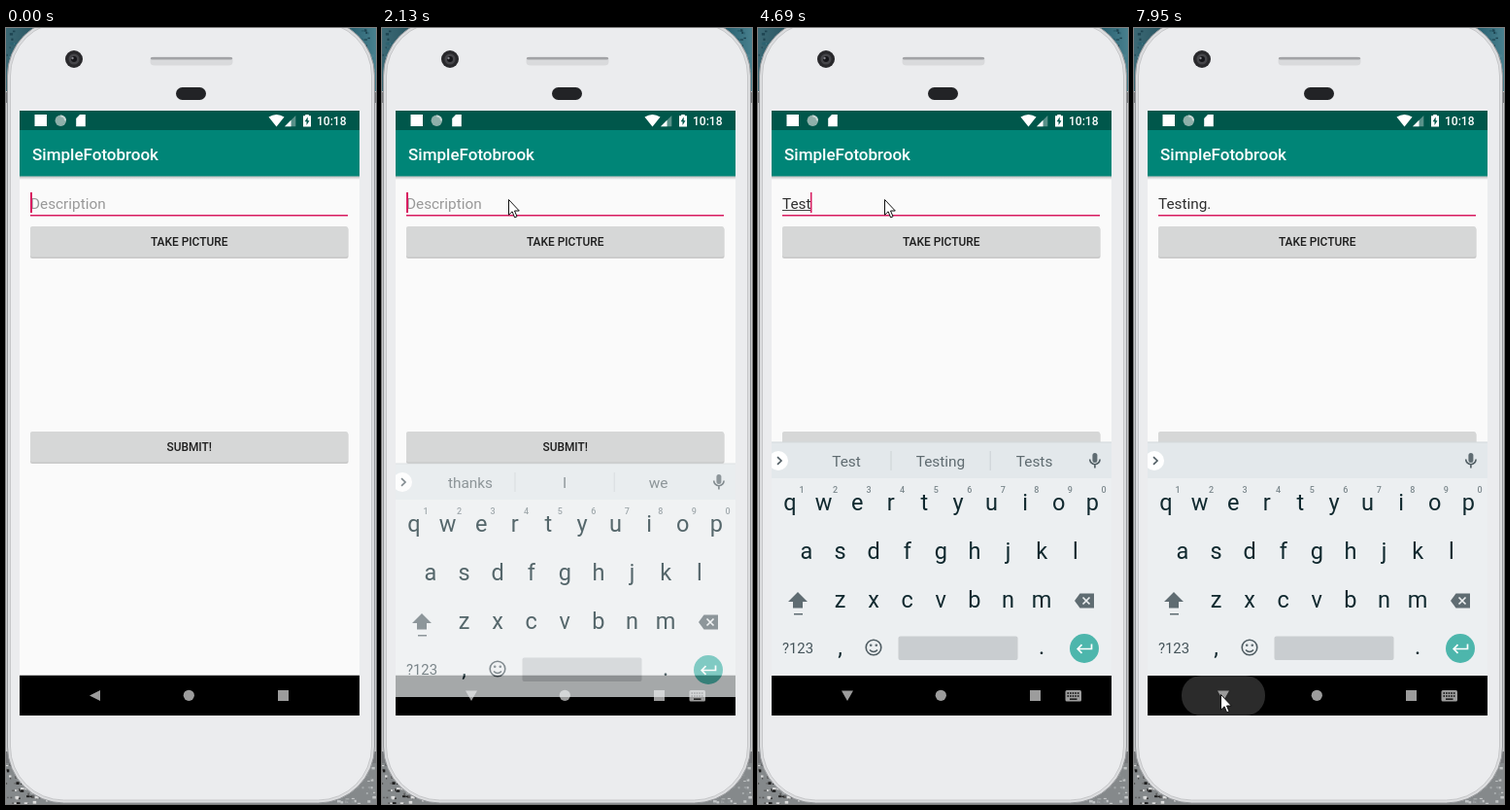
Write an HTML page that moves like this. It is 381x798 px and loops after 8000 ms.

```html
<!DOCTYPE html>
<html lang="en">
<head>
<meta charset="utf-8">
<title>Description form</title>
<style>
html, body { margin: 0; width: 100%; height: 100%; overflow: hidden; background: #c9cacc; }
svg { display: block; width: 100vw; height: 100vh; }
text { font-family: Roboto, "Open Sans", sans-serif; white-space: pre; }
.mid { text-anchor: middle; }
.medium { font-weight: 500; }
.key { font-size: 23.5px; fill: #10292f; }
.hint { font-size: 9px; font-weight: 500; fill: #7c888d; }
.word { font-size: 15.4px; fill: #5f6b70; }
.field { font-size: 15.33px; }
.label { font-size: 11.92px; font-weight: 500; fill: #1d1d1d; }
.icon { fill: #5f6c72; }
.line { fill: none; stroke: #4f5c62; stroke-width: 1.6; }
</style>
</head>
<body>
<svg viewBox="0 0 381 798" preserveAspectRatio="none">
  <defs>
    <linearGradient id="sky"><stop stop-color="#3c6975"/><stop offset=".1" stop-color="#24505c"/><stop offset=".9" stop-color="#1c5364"/><stop offset="1" stop-color="#48808e"/></linearGradient>
    <linearGradient id="shade" x2="0" y2="1"><stop stop-color="#000" stop-opacity=".25"/><stop offset="1" stop-color="#000" stop-opacity="0"/></linearGradient>
    <clipPath id="screen"><path d="M14 85H364V707H14Z"/></clipPath>
    <clipPath id="navClip"><rect x="49" y="666" width="86" height="41" rx="20"/></clipPath>
  </defs>

  <path fill="#c9cacc" d="M0 0H381V798H0Z"/>
  <path fill="url(#sky)" d="M0 0H381V65H0Z"/>
  <path fill="#85898b" d="M0 750H381V798H0Z"/>
  <g id="specks"></g>
  <path fill="#77797c" d="M0 66H4V77H0ZM377 66H381V77H377ZM0 744H4V756H0ZM377 744H381V756H377Z"/>
  <rect x="1.5" y="-9" width="378" height="806" rx="58" fill="#dcdddf" stroke="#96989b"/>
  <rect x="4.5" y="-6" width="372" height="800" rx="55" fill="#ebecee" stroke="#c6c7c9"/>
  <circle cx="70" cy="32" r="9" fill="#29292c"/>
  <circle cx="70" cy="32" r="5.5" fill="#454549"/>
  <circle cx="70" cy="32" r="3" fill="#151519"/>
  <circle cx="68.5" cy="31" r="1.2" fill="#85858c"/>
  <rect x="148.5" y="29.5" width="85" height="9" rx="4" fill="#d9dadc"/>
  <rect x="149" y="30" width="84" height="2.5" rx="1.2" fill="#a2a3a6"/>
  <rect x="175" y="61" width="31" height="13" rx="6.5" fill="#222326"/>

  <g clip-path="url(#screen)">
    <path fill="#fafafa" d="M14 85H364V707H14Z"/>
    <path fill="#00574b" d="M14 85H364V105H14Z"/>
    <path fill="#008577" d="M14 105H364V152.5H14Z"/>
    <path fill="url(#shade)" d="M14 152.5H364V156H14Z"/>
    <text class="medium" x="27" y="135.5" font-size="17.03" fill="#fff">SimpleFotobrook</text>

    <g fill="#fff">
      <path d="M29.5 89H42V101H29.5Z"/>
      <circle cx="56.3" cy="95.3" r="5.7" fill="#8fb0aa"/>
      <path d="M56.3 89.6a5.7 5.7 0 0 1 5.7 5.7h-2a3.7 3.7 0 0 0-3.7-3.7Z" fill="#c7d8d5"/>
      <path d="M76 89H81.8V101.2H72.2V93Z"/>
      <path d="M270.5 91.5Q278.5 86.5 286.5 91.5L278.5 101.5Z"/>
      <path d="M287 101.2L298.3 90V101.2Z" opacity=".35"/>
      <path d="M287 101.2L293.5 94.8V101.2Z"/>
      <path d="M306 90.3H308.2V89H311.8V90.3H314V101.5H306Z"/>
      <path d="M310.7 91.5L307.6 96.3H309.5V100L312.5 95.2H310.7Z" fill="#00574b"/>
      <text class="medium" x="320" y="99.5" font-size="12">10:18</text>
    </g>

    <text class="field" id="hint" x="25" y="186" fill="#989898">Description</text>
    <text class="field" id="typed" x="25" y="186" fill="#2e2e2e"></text>
    <rect id="composing" x="25" y="187" height="1" fill="#444"/>
    <path fill="#d81b60" d="M25 192H352V193.4H25Z"/>
    <rect id="caret" y="169" width="2" height="21" fill="#d81b60"/>
    <g id="buttons"></g>

    <path d="M14 665.7H364V707H14Z"/>
    <g clip-path="url(#navClip)"><circle id="ripple" cx="91.5" cy="686.5" fill="#2b2b2b"/></g>
    <g fill="#9c9c9c">
      <path id="back" d="M86 686.5L97 681V692Z"/>
      <path id="down" d="M86 681.5H98L92 692Z"/>
      <circle cx="188.3" cy="686.3" r="5.6"/>
      <path d="M280 681H291V692H280Z"/>
      <g id="switcher">
        <rect x="316.5" y="681" width="16.5" height="11.5" rx="1.5"/>
        <path d="M318.5 684H331.5M318.5 687H331.5" stroke="#000" stroke-width="1.3" stroke-dasharray="1.5 1.1"/>
        <path d="M321 689.5H328.5V690.8H321Z" fill="#000"/>
      </g>
    </g>

    <g id="keyboard">
      <path fill="#eceff1" d="M14 426H364V666H14Z"/>
      <path fill="#e3e8eb" d="M14 426H364V463H14Z"/>
      <path fill="#d4d9db" d="M14 425.5H364V426.5H14Z"/>
      <circle cx="21" cy="445" r="10" fill="#fff"/>
      <path class="line" d="M20 441.2L24 445L20 448.8"/>
      <g id="words">
        <path fill="#cbd1d4" d="M136.5 435H137.5V455H136.5ZM238.7 435H239.7V455H238.7Z"/>
        <text class="word mid" x="91" y="450.8"></text>
        <text class="word mid" x="188" y="450.8"></text>
        <text class="word mid" x="284.6" y="450.8"></text>
      </g>
      <rect class="icon" x="344.4" y="437" width="5" height="10" rx="2.5"/>
      <path class="line" d="M341.7 443.5a5.2 5.2 0 0 0 10.4 0M346.9 448.7V452.5"/>
      <g id="keys"></g>
      <path class="icon" d="M41 580L51 590H46V596.5H36V590H31ZM37 602H46V603.4H37Z"/>
      <path class="icon" d="M326 589L331.5 581.5H346V596.5H331.5Z"/>
      <path d="M334.5 585.5L341.5 592.5M341.5 585.5L334.5 592.5" stroke="#eceff1" stroke-width="1.7"/>
      <text class="mid" x="41" y="643" font-size="14.9" fill="#45545a">?123</text>
      <text class="key mid" x="84.5" y="645" font-size="20">,</text>
      <text class="key mid" x="292" y="644" font-size="20">.</text>
      <circle class="line" cx="119" cy="637" r="7.8"/>
      <path class="line" d="M115 639.5Q119 643.5 123 639.5"/>
      <circle class="icon" cx="116.2" cy="634.8" r="1.3"/>
      <circle class="icon" cx="121.8" cy="634.8" r="1.3"/>
      <rect x="144.5" y="625.5" width="123" height="24.5" rx="2" fill="#c9cdd0"/>
      <circle cx="336" cy="638" r="15" fill="#4db6ac"/>
      <path d="M343.5 633.5V638.5H329.5M333.5 634.2L329.2 638.5L333.5 642.8" fill="none" stroke="#fff" stroke-width="1.7"/>
    </g>
  </g>
  <path id="pointer" d="M.5 .5V16.2L4.1 12.8L6.6 18.8L9 17.8L6.5 12H11.3Z" fill="#fff" stroke="#111" stroke-width="1"/>
</svg>

<script>
const LOOP = 8000;
const $ = id => document.getElementById(id);
const range = n => [...Array(n).keys()];

// Static repeats
const button = (y, label) => `
  <rect x="25" y="${y + 1}" width="327.5" height="32" rx="2" fill="#000" opacity=".2"/>
  <rect x="25" y="${y}" width="327" height="31.5" rx="2" fill="#d6d7d7"/>
  <text class="label mid" x="188.7" y="${y + 20}">${label}</text>`;
$('buttons').innerHTML = button(204, 'TAKE PICTURE') + button(415, 'SUBMIT!');

const keyRow = (letters, x, y) => [...letters].map((c, i) =>
  `<text class="key mid" x="${x + i * 34.6}" y="${y}">${c}</text>`).join('');
const hints = range(10).map(i =>
  `<text class="hint mid" x="${45 + i * 34.55}" y="478">${(i + 1) % 10}</text>`).join('');
$('keys').innerHTML = keyRow('qwertyuiop', 33, 496) + hints +
  keyRow('asdfghjkl', 50, 546) + keyRow('zxcvbnm', 84.5, 596);

let seed = 7;
const random = () => (seed = seed * 16807 % 2147483647) / 2147483647;
const speck = (x, y, fill) =>
  `<rect x="${x}" y="${y}" width="${1 + random() * 3}" height="${1 + random() * 2}" fill="${fill}"/>`;
$('specks').innerHTML = range(320).map(i => {
  const x = random() * 45, left = i % 2;
  const top = i % 4 < 2;
  const tones = top ? ['#1d4350', '#4e8290', '#2d6270'] : left ? ['#1c1c1c', '#dcdcdc', '#555'] : ['#a5a9ab', '#8b9092', '#c2c5c6'];
  return speck(left ? x : 378 - x, top ? random() * 48 : 752 + random() * 46, tones[i % 3]);
}).join('');

// Timelines: each entry holds from its time until the next one
const pointerSteps = [
  [0, -50, 0], [440, 251, 554], [520, 218, 445], [600, 179, 351],
  [750, 170, 298], [830, 160, 248], [900, 154, 220], [980, 150, 200],
  [1060, 147, 194], [1140, 143, 187], [1210, 138, 180], [1290, 133, 174],
  [1370, 130, 171], [1520, 130, 174], [1600, 130, 176],
  [6940, 131, 270], [7020, 133, 500], [7090, 133, 597],
  [7320, 128, 612], [7400, 112, 645], [7480, 98, 672], [7550, 91, 682], [7630, 89, 685]
];
const typing = [[0, ''], [3590, 'T'], [4070, 'Te'], [4460, 'Tes'], [4690, 'Test'],
  [4840, 'Testi'], [5070, 'Testin'], [5240, 'Testing'], [6160, 'Testing.']];
const suggestions = [
  [0, 'thanks I we'], [3670, 'T The These'], [4140, 'Te Tell Team'],
  [4460, 'Tes Test Testing'], [4690, 'Test Testing Tests'],
  [4840, 'Testi Testing Testimony'], [5070, 'Testin Testing Tester'],
  [5240, 'Testing Testings Tests'], [6160, 'thanks I we'], [7860, '']
];
const caretToggles = [290, 750, 1210, 1750, 2290, 2750, 3210, 3590, 5700, 6160, 6620, 7090, 7550];
const keyboardSteps = [[0, 0, 0], [2130, 22, .7], [2210, 5, .93], [2290, 0, 1]];
const rippleSteps = [[0, 0], [7780, 16], [7860, 32], [7950, 50]];

const at = (steps, t) => steps.findLast(step => step[0] <= t);
const show = (id, visible) => $(id).style.display = visible ? '' : 'none';
const words = document.querySelectorAll('#words text');

function draw(t) {
  const [, px, py] = at(pointerSteps, t);
  $('pointer').setAttribute('transform', `translate(${px} ${py})`);

  const text = at(typing, t)[1];
  $('typed').textContent = text;
  const width = text ? $('typed').getComputedTextLength() : 0;
  show('hint', !text);
  $('composing').setAttribute('width', text.endsWith('.') ? 0 : width);
  $('caret').setAttribute('x', Math.floor(25 + width));
  $('caret').setAttribute('width', text ? 1.5 : 2);
  show('caret', caretToggles.filter(time => time <= t).length % 2 === 0);

  const [, shift, opacity] = at(keyboardSteps, t);
  $('keyboard').setAttribute('transform', `translate(0 ${shift})`);
  $('keyboard').setAttribute('opacity', opacity);
  const options = at(suggestions, t)[1];
  show('words', options);
  options.split(' ').forEach((word, i) => words[i].textContent = word);

  const open = t >= 1980;
  show('back', !open);
  show('down', open);
  show('switcher', open);
  $('ripple').setAttribute('r', at(rippleSteps, t)[1]);
}

const start = performance.now();
function tick() {
  draw((performance.now() - start) % LOOP);
  requestAnimationFrame(tick);
}
tick();
</script>
</body>
</html>
```
